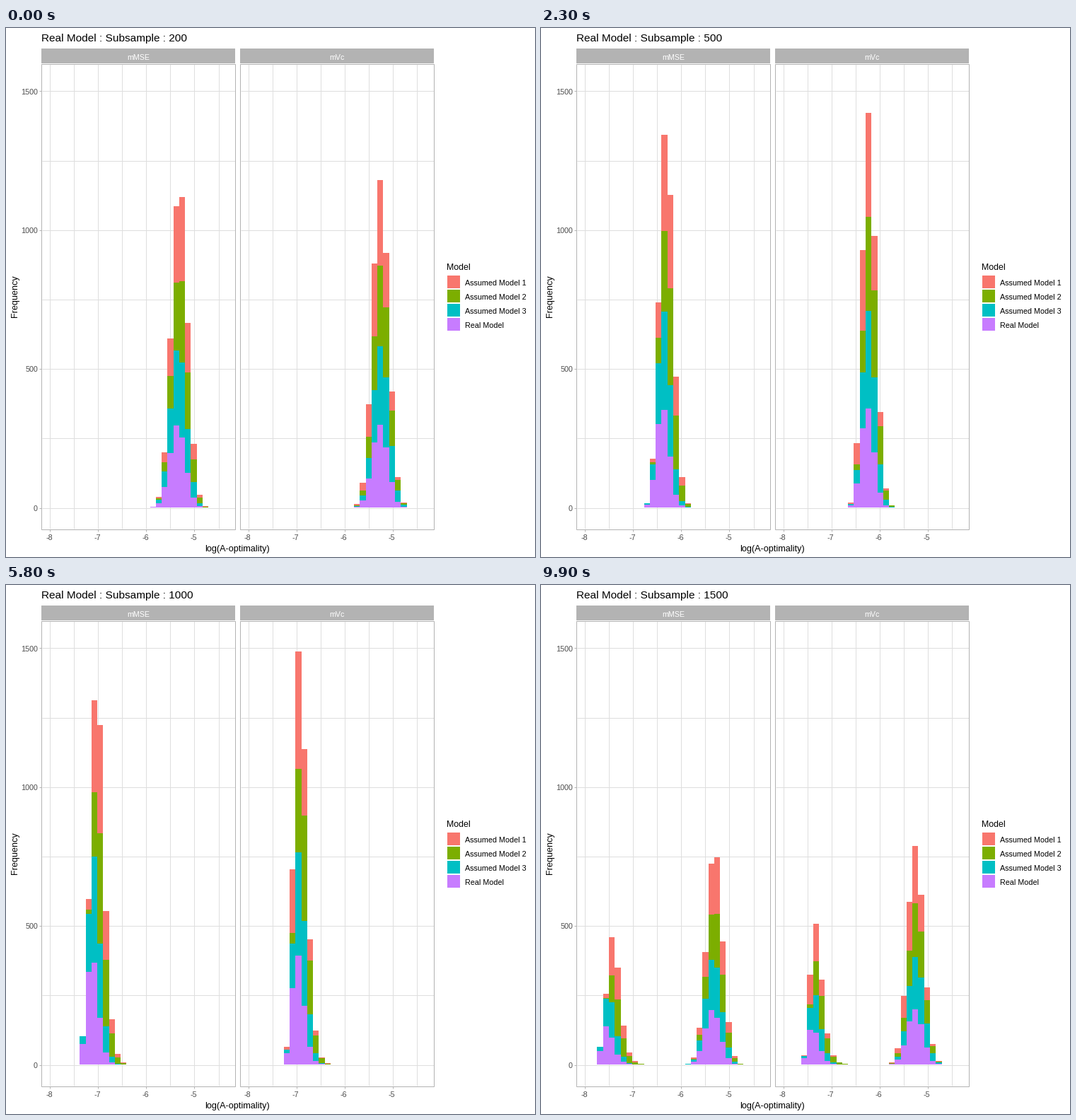
Write a matplotlib script that moves like this. It is 748 px wide and 748 px high and loops after 10 s.

```python
import math

import numpy as np
import matplotlib.pyplot as plt
from matplotlib.animation import FuncAnimation
from matplotlib.patches import Rectangle

SIZE, DPI = 748, 100
PX = 72 / DPI                      # one pixel in points
FRAMES, INTERVAL = 100, 100
BINS, DRAWS = 26, 1000             # bins per panel, values per model
LEFT, BIN_W = 71.2, 8.27           # first bin edge and bin width
BASE, PER_COUNT = 678.2, 0.3928    # zero level and pixels per count
PANEL_X = (50, 331)
SHIFT = 280.3                      # distance between the two x scales

GREY, GRID, TICK_TEXT = "#B3B3B3", "#DEDEDE", "#4D4D4D"

# Bottom of the stack first: name, colour, relative spread, skew growth.
MODELS = (("Real Model", "#C77CFF", 1.00, 0.07),
          ("Assumed Model 3", "#00BFC4", 1.04, 0.05),
          ("Assumed Model 2", "#7CAE00", 1.02, 0.10),
          ("Assumed Model 1", "#F8766D", 0.95, 0.10))

# Name, quadratic for the median bin, and each model's (offset, drift) from it.
PANELS = (("mMSE", (0.36, -9.6, 20.73),
           ((0, 0), (0.27, 0.13), (0.60, 0.50), (0.42, 0.41))),
          ("mVc", (0.25, -9.1, 21.44),
           ((0, 0), (0.33, 0.07), (0.30, 0.40), (-0.17, 0.20))))

SAMPLES = range(200, 1501, 100)
# First frame and number of steps of each change.
MOVES = [(4 + 8 * i, 4) if i < 3 else (28 + 7 * (i - 3), 3)
         for i in range(len(SAMPLES))]


def normal_cdf(z):
    return np.array([0.5 * (1 + math.erf(v / math.sqrt(2))) for v in z])


def counts(median, spread, skew):
    """Bin counts of a shifted log-normal sample."""
    y = (np.arange(BINS + 1) - median) / spread
    z = np.log(np.maximum(1 + skew * y, 1e-9)) / skew
    return np.round(DRAWS * np.diff(normal_cdf(z)))


def stacks(panel, n):
    """Stacked bar tops of one panel for subsample size n."""
    _, curve, offsets = panel
    t = math.log(n / SAMPLES[0])
    spread = 0.88 + 0.42 * math.exp(-t)
    rows = [counts(np.polyval(curve, t) + offset + drift * t,
                   spread * width, 0.001 + growth * t * t)
            for (offset, drift), (_, _, width, growth) in zip(offsets, MODELS)]
    return np.cumsum(rows, axis=0)


STATES = np.array([[stacks(p, n) for p in PANELS] for n in SAMPLES])

plt.rcParams["font.family"] = "Liberation Sans"
fig = plt.figure(figsize=(SIZE / DPI, SIZE / DPI), dpi=DPI, facecolor="white")
ax = fig.add_axes([0, 0, 1, 1])
ax.set_axis_off()


def line(x, y, color, z=1):
    ax.plot(x, y, color=color, lw=PX, zorder=z, solid_capstyle="butt")


def box(x, y, w, h, z=1, **style):
    ax.add_patch(Rectangle((x, y), w, h, zorder=z, **style))


def label(x, y, text, size, color="black", **kw):
    return ax.text(x, y, text, fontsize=size * PX, color=color, zorder=6, **kw)


def draw_panel(i, name):
    x0 = PANEL_X[i]
    x1 = x0 + 274
    box(x0, 29, 274.5, 20.5, facecolor=GREY, lw=0)
    label((x0 + x1) / 2, 44.5, name, 10.6, "white", ha="center")
    for k in range(8):
        x = 62.3 + 34.03 * k + SHIFT * i
        line([x, x], [51, 708], GRID)
        if k % 2 == 0:
            line([x, x], [709, 712], GREY)
            label(x - 1, 724, str(k // 2 - 8), 10.75, TICK_TEXT, ha="center")
    for k in range(7):
        y = 678.5 - 98.2 * k
        line([x0 + 1, x1], [y, y], GRID)
        if i == 0 and k % 2 == 0:
            line([47, 50], [y, y], GREY)
            label(45, y + 4.2, str(250 * k), 10.75, TICK_TEXT, ha="right")
    box(x0 + 0.5, 50.5, 274, 658, 5, fill=False, edgecolor=GREY, lw=PX)


def make_bars(i):
    edges = LEFT + SHIFT * i + BIN_W * np.arange(BINS + 1)
    return [ax.stairs(np.full(BINS, BASE), edges, baseline=BASE, fill=True,
                      color=model[1], lw=0, zorder=4 - 0.1 * m)
            for m, model in enumerate(MODELS)]


for i, panel in enumerate(PANELS):
    draw_panel(i, panel[0])
bars = [make_bars(i) for i in range(len(PANELS))]

title = label(50, 19, "", 15.4)
label(327.5, 740, "log(A-optimality)", 12.6, ha="center")
label(18.6, 379, "Frequency", 12.6, rotation=90, ha="right", va="center")
label(623, 342, "Model", 12.4)
for i, (name, color, *_) in enumerate(reversed(MODELS)):
    box(624, 350 + 20 * i, 18, 18, facecolor=color, lw=0)
    label(649, 363.5 + 20 * i, name, 10.75)

ax.set_xlim(0, SIZE)
ax.set_ylim(SIZE, 0)


def update(frame):
    state, following, shown, weight = 0, 0, 0, 0.0
    for i, (start, steps) in enumerate(MOVES):
        step = frame - start + 1
        if step >= 1:
            state, following = i, (i + 1) % len(SAMPLES)
            weight = min(step / steps, 1)
            shown = following if step >= 3 else state
    tops = (1 - weight) * STATES[state] + weight * STATES[following]
    for group, heights in zip(bars, tops):
        for bar, h in zip(group, heights):
            bar.set_data(values=BASE - PER_COUNT * h)
    title.set_text(f"Real Model : Subsample : {SAMPLES[shown]}")
    return [title, *bars[0], *bars[1]]


anim = FuncAnimation(fig, update, frames=FRAMES, interval=INTERVAL,
                     init_func=lambda: update(0), repeat=True, blit=False)
plt.show()
```
